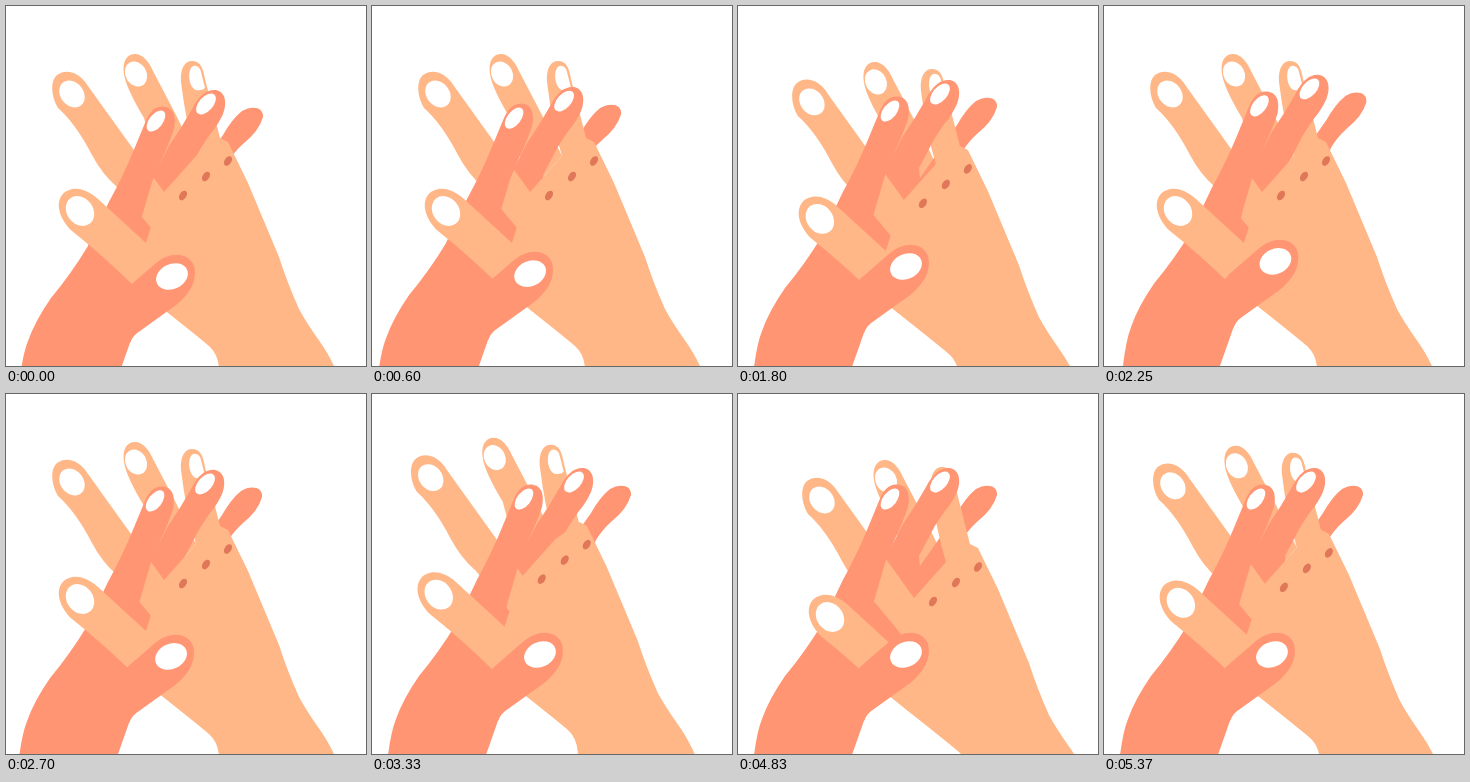
Animation of 360 by 360 pixels, one loop 5.4 s. Source, as an HTML page:

```html
<!DOCTYPE html>
<html lang="en">
<head>
<meta charset="utf-8">
<title>Rubbing hands</title>
<style>
  html, body { margin: 0; height: 100%; overflow: hidden; background: #fff; }
  svg { display: block; width: 100vw; height: 100vh; }
  .light { fill: #ffb787; }
  .dark { fill: #ff9573; }
  .nail { fill: #fff; }
  .knuckle { fill: #df7758; }
</style>
</head>
<body>
<svg viewBox="0 0 360 360">
  <!-- middle finger of the light hand -->
  <g class="light">
    <path d="M158 186L138 112Q120 82 118 68C116 55 121 48 129 48C137 48 143 56 147 65Q158 86 170 109L190 150Z"/>
    <ellipse class="nail" rx="10.5" ry="13" transform="translate(130 68) rotate(-28)"/>
  </g>
  <!-- little finger of the dark hand -->
  <g class="dark">
    <path d="M182 172L219 119Q228 103 238 95C248 89 260 91 259 101Q255 115 240 127Q230 136 224 146L195 215L180 210Z"/>
  </g>
  <!-- ring finger of the light hand -->
  <g class="light">
    <path d="M190 150Q180 118 175 76C174 62 179 55 186 55C194 55 197 61 199 73L214 132L210 180Z"/>
    <path class="nail" d="M190 60Q194 61 195 66L199 82Q196 85 190 84C184 82 181 69 185 62Q187 59 190 60Z"/>
  </g>
  <!-- arm, palm and middle finger of the dark hand -->
  <g class="dark">
    <path d="M13 395Q16 345 24 325Q31 305 47 282Q67 258 84 230L106 184L150 180L178 256L128 321L102 395Z"/>
    <path d="M148 163L165 130Q178 111 188 93C195 79 203 73 212 74C222 76 223 88 219 98Q214 109 207 117Q196 132 190 145L181 162L182 172L190 212L125 205Z"/>
    <ellipse class="nail" rx="7" ry="12.5" transform="translate(202 88) rotate(42)"/>
  </g>
  <!-- back of the light hand with its index finger -->
  <g class="light">
    <path d="M158 186L82 80C74 66 60 62 51 69C44 75 45 91 52 102Q70 118 86 149Q96 168 111 181L145 222L140 237L127 275L152 299Q190 329 203 340Q212 348 213 362L214 380L337 380L328 360Q322 347 312 333Q300 316 293 303Q281 276 273 251L242 177L222 136L214 132L190 150Z"/>
    <ellipse class="nail" rx="11.5" ry="14.5" transform="translate(66 88) rotate(-38)"/>
    <ellipse class="knuckle" rx="3.4" ry="5.3" transform="translate(177 189.5) rotate(33)"/>
    <ellipse class="knuckle" rx="3.4" ry="5.3" transform="translate(200 170.5) rotate(33)"/>
    <ellipse class="knuckle" rx="3.4" ry="5.3" transform="translate(222 155) rotate(33)"/>
  </g>
  <!-- index finger of the dark hand -->
  <g class="dark">
    <path d="M84 230L106 184Q120 158 129 136L141 107C146 94 153 89 162 91C171 93 172 103 170 113Q165 128 157 145L148 166L136 207L130 232L95 250Z"/>
    <ellipse class="nail" rx="6.8" ry="12.3" transform="translate(152 105) rotate(38)"/>
  </g>
  <!-- thumb of the light hand -->
  <g class="light">
    <path d="M145 221L140 237L92 193C78 180 63 180 56 189C49 198 54 214 66 225Q95 248 127 279L152 299L178 230Z"/>
    <ellipse class="nail" rx="13" ry="16" transform="translate(74 205) rotate(-38)"/>
  </g>
  <!-- thumb of the dark hand -->
  <g class="dark">
    <path d="M122 273L152 247C165 236 184 235 190 250C194 266 184 281 168 292L136 315Q129 319 126 327L100 300Z"/>
    <ellipse class="nail" rx="16.5" ry="12.5" transform="translate(168 260.5) rotate(-25)"/>
  </g>
</svg>
<script>
const LOOP = 5400, CYCLE = 1830;
const parts = name => document.querySelectorAll('g.' + name);
const lightParts = parts('light'), darkParts = parts('dark');

// Keys: time, x, y
const darkKeys = [[0, 0, 0], [230, 14, -20], [330, 9.3, -11.7], [570, -7, 5],
  [670, -15, 10], [870, -3, 2], [900, 0, 0]];
const firstDarkKeys = [[0, -2, 10], ...darkKeys.slice(1)];
const lightKeys = [[900, 0, 0], [1020, 12, 12], [1145, 18.3, 18.3], [1540, -8, -5],
  [1815, 8, 8], [2010, 0, 0]];

// Slope at a key, flat at turning points and at both ends
function slope(keys, i, axis) {
  const a = keys[i - 1], b = keys[i], c = keys[i + 1];
  if (!a || !c || (b[axis] - a[axis]) * (c[axis] - b[axis]) <= 0) return 0;
  return (c[axis] - a[axis]) / (c[0] - a[0]);
}

function valueAt(keys, t, axis) {
  const last = keys.length - 1;
  if (t <= keys[0][0]) return keys[0][axis];
  if (t >= keys[last][0]) return keys[last][axis];
  const i = keys.findIndex(k => k[0] > t) - 1;
  const a = keys[i], b = keys[i + 1];
  const span = b[0] - a[0], s = (t - a[0]) / span, r = 1 - s;
  return a[axis] * r * r * (1 + 2 * s) + b[axis] * s * s * (3 - 2 * s)
    + span * s * r * (slope(keys, i, axis) * r - slope(keys, i + 1, axis) * s);
}

function move(nodes, keys, t) {
  const shift = `translate(${valueAt(keys, t, 1)} ${valueAt(keys, t, 2)})`;
  nodes.forEach(node => node.setAttribute('transform', shift));
}

function draw() {
  const t = performance.now() % LOOP;
  const phase = t % CYCLE, first = t < CYCLE;
  move(darkParts, first ? firstDarkKeys : darkKeys, phase);
  // The light hand settles while the next cycle is already under way
  move(lightParts, lightKeys, !first && phase < 400 ? phase + CYCLE : phase);
  requestAnimationFrame(draw);
}
draw();
</script>
</body>
</html>
```
